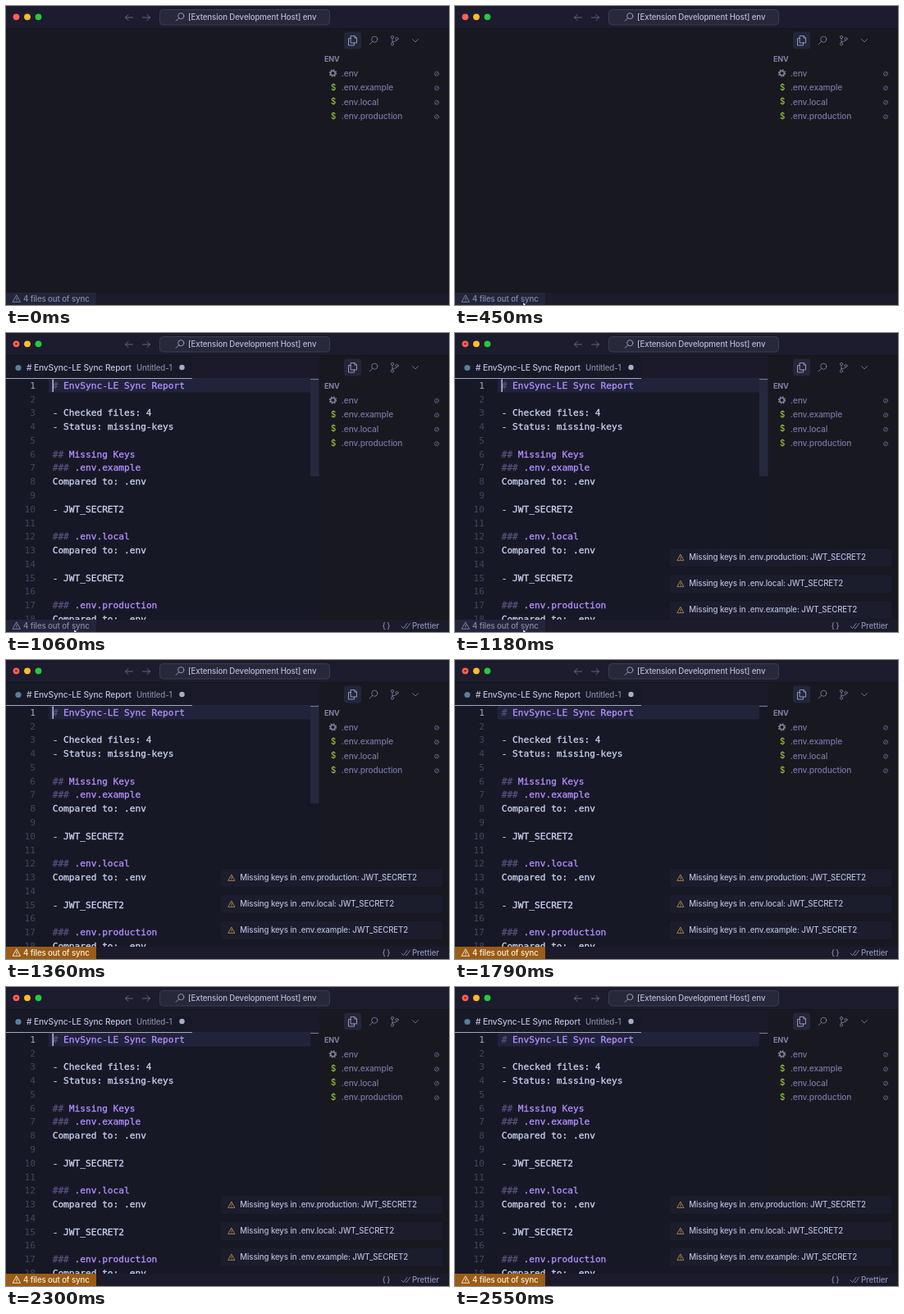
Recreate the animation shown at these times as an HTML page. Size 540 by 365 pixels, loop 2.58 s.

```html
<!DOCTYPE html>
<html lang="en">
<head>
<meta charset="utf-8">
<style>
  html, body { margin: 0; width: 100%; height: 100%; overflow: hidden; background: #181820; }
  svg { display: block; width: 540px; height: 365px; }
  text { font: 500 9.7px Inter, sans-serif; letter-spacing: -.12px; white-space: pre; }
  .code text { font: 11.17px "DejaVu Sans Mono", monospace; letter-spacing: 0; }
  .body { stroke: currentColor; stroke-width: .3; }
  .line { fill: none; stroke-width: .9; stroke-linecap: round; stroke-linejoin: round; }
</style>
</head>
<body>
<svg viewBox="0 0 540 365">
  <defs>
    <path id="warn" class="line" d="M0-4.4 4.500 3.800H-4.500ZM0-1.500V1.200M0 2.500V2.600"/>
    <path id="alarm" class="line" d="M0-3.700 3.900 3.400H-3.900ZM0-1.200V1M0 2.100V2.200"/>
    <g id="lens" class="line"><circle cx="1.3" cy="-1.3" r="3.6"/><path d="M-1.3 1.3-4.8 4.8"/></g>
  </defs>

  <rect width="540" height="365" fill="#181820"/>
  <rect width="540" height="27" fill="#1c1c2e"/>
  <path d="M0 27.5H540" stroke="#14141d"/>
  <circle cx="12.5" cy="13.3" r="3.9" fill="#ff5f57"/>
  <circle cx="26" cy="13.3" r="3.9" fill="#febc2e"/>
  <circle cx="39.5" cy="13.3" r="3.9" fill="#28c840"/>
  <path class="line" stroke="#6c6d8f" d="M154.500 14H145.500M149 10.500 145.500 14 149 17.500M166.500 14H175.500M172 10.500 175.500 14 172 17.500"/>
  <rect x="187.500" y="4.500" width="207" height="18.500" rx="4" fill="#28283b" stroke="#3c3c52"/>
  <use href="#lens" x="212" y="13.500" stroke="#a0a2c0"/>
  <text x="222" y="17" fill="#b4b8d8">[Extension Development Host] env</text>

  <g id="editor">
    <circle cx="12.500" cy="13.300" r="1.300" fill="#8c1d18"/>
    <rect y="28" width="382" height="322" fill="#171826"/>
    <rect y="28" width="382" height="27.500" fill="#1a1a2a"/>
    <rect y="28" width="227" height="27.500" fill="#181927"/>
    <path d="M227 55.500H382" stroke="#25263a"/>
    <path d="M0 55.500H227" stroke="#a3a7bd"/>
    <circle cx="15" cy="42.500" r="3.600" fill="#587f9c"/>
    <text x="25" y="46" fill="#b9bedb" style="font-size:10.200px"># EnvSync-LE Sync Report</text>
    <text x="159" y="46" fill="#85879f" style="font-size:9.700px">Untitled-1</text>
    <circle cx="214.500" cy="42" r="3.200" fill="#a9acc8"/>
    <rect x="52" y="56" width="319" height="16.500" fill="#20233a"/>
    <g id="code" class="code"></g>
    <rect id="slider" x="371" y="56" width="10.500" height="119" fill="#26283d"/>
    <path d="M371 56.500H381" stroke="#77798f"/>
    <rect id="caret" x="56.500" y="56.500" width="1.300" height="15.500" fill="#d5d8ee"/>
  </g>

  <rect x="412" y="31.500" width="21" height="21" rx="3" fill="#242639"/>
  <path class="line" stroke="#9ba1cc" d="M420.500 36.500H425L427.500 39V45H420.500ZM425 36.500V39H427.500M420.500 39.500H417.500V48H424.500V45"/>
  <use href="#lens" x="448" y="42" stroke="#777799"/>
  <g class="line" stroke="#777799">
    <circle cx="471" cy="38" r="1.600"/><circle cx="471" cy="46.500" r="1.600"/><circle cx="476.500" cy="40" r="1.600"/>
    <path d="M471 39.600V44.900M476.500 41.600Q476.500 43.500 471 43.500M495.500 40.500 499 44 502.500 40.500"/>
  </g>
  <text x="388" y="68.300" fill="#8082a6" style="font-size:9px;font-weight:700">ENV</text>
  <g id="files"></g>

  <g id="toasts"></g>

  <rect y="350" width="540" height="15" fill="#1b1b2c"/>
  <rect id="badge" y="350" width="110" height="15"/>
  <g id="sync">
    <use href="#warn" x="13" y="357.500"/>
    <text x="21" y="361" stroke="none">4 files out of sync</text>
  </g>
  <g id="format">
    <text x="458.500" y="360.800" fill="#8488a8" style="letter-spacing:1.500px">{}</text>
    <path class="line" stroke="#8488a8" d="M482 358 484.500 360.500 489 354.500M487 360 488 360.800 492.500 354.500"/>
    <text x="495" y="361" fill="#8b8fb0">Prettier</text>
  </g>
  <path id="pointer" d="M83 361.500V370L88 366.500Z" fill="#fff" stroke="#111" stroke-width=".5"/>
</svg>

<script>
const LOOP = 2580, OPEN = 1030, TOAST = 1060, ALERT = 1270;
const $ = id => document.getElementById(id);

const report = [
  "# EnvSync-LE Sync Report", "", "- Checked files: 4", "- Status: missing-keys", "",
  "## Missing Keys", "### .env.example", "Compared to: .env", "", "- JWT_SECRET2", "",
  "### .env.local", "Compared to: .env", "", "- JWT_SECRET2", "",
  "### .env.production", "Compared to: .env"
];
$("code").innerHTML = report.map((line, i) => {
  const y = 67.8 + i * 16.77;
  const [, hash, words] = line.match(/^(#*)(.*)/);
  const ink = hash ? "#b48fff" : "#cbd2f0";
  return `<text x="36" y="${y}" text-anchor="end" fill="${i ? "#42455f" : "#a6a9c6"}">${i + 1}</text>
    <text class="body" x="56.700" y="${y}" fill="${ink}" color="${ink}"><tspan fill="#58517f" color="#58517f">${hash}</tspan>${words}</text>`;
}).join("");

const gear = `<circle cx="398.500" cy="82" r="2.800" fill="none" stroke="#85869a" stroke-width="1.500"/>
  <circle cx="398.500" cy="82" r="4.100" fill="none" stroke="#85869a" stroke-width="1.300" stroke-dasharray="1.610"/>`;
$("files").innerHTML = [".env", ".env.example", ".env.local", ".env.production"].map((name, i) => {
  const y = 82.2 + i * 17.5;
  const icon = i ? `<text x="396" y="${y + 3.2}" fill="#93c23c" style="font-size:9.700px">$</text>` : gear;
  return `${icon}<text x="408.800" y="${y + 3.7}" fill="#7677a4" style="font-size:10.200px">${name}</text>
    <g class="line" stroke="#62638a"><circle cx="525" cy="${y + .5}" r="2.500"/><path d="M523.500 ${y + 2}l3-3"/></g>`;
}).join("");

$("toasts").innerHTML = ["production", "local", "example"].map((name, i) => {
  const y = 266 + i * 32;
  return `<rect x="261" y="${y - 11.5}" width="272" height="23" rx="2" fill="#1b1c2c" stroke="#171723"/>
    <use href="#alarm" x="275" y="${y}" stroke="#b08a48"/>
    <text x="285.300" y="${y + 3.2}" fill="#b6bad8">Missing keys in .env.${name}: JWT_SECRET2</text>`;
}).join("");

const clamp = v => Math.min(1, Math.max(0, v));
const show = (id, on) => $(id).setAttribute("opacity", Number(on));

function draw(t) {
  const open = t >= OPEN, alert = t >= ALERT;
  const enter = 1 - (1 - clamp((t - TOAST) / 300)) ** 2;

  show("editor", open);
  show("format", open);
  show("caret", (t - OPEN) % 1000 < 500);
  show("slider", 1 - clamp((t - 1430) / 330));
  show("toasts", clamp(enter * 1.7));
  $("toasts").setAttribute("transform", `translate(0 ${23 * (1 - enter)})`);

  show("badge", t < 760 || open);
  $("badge").setAttribute("fill", alert ? "#9b5c13" : "#23253a");
  const ink = alert ? "#f6efe6" : "#858aaa";
  $("sync").setAttribute("fill", ink);
  $("sync").setAttribute("stroke", ink);
  show("pointer", t >= 450 && !alert);
}

let start;
function tick(now) {
  start ??= now;
  draw((now - start) % LOOP);
  requestAnimationFrame(tick);
}
draw(0);
requestAnimationFrame(tick);
</script>
</body>
</html>
```
